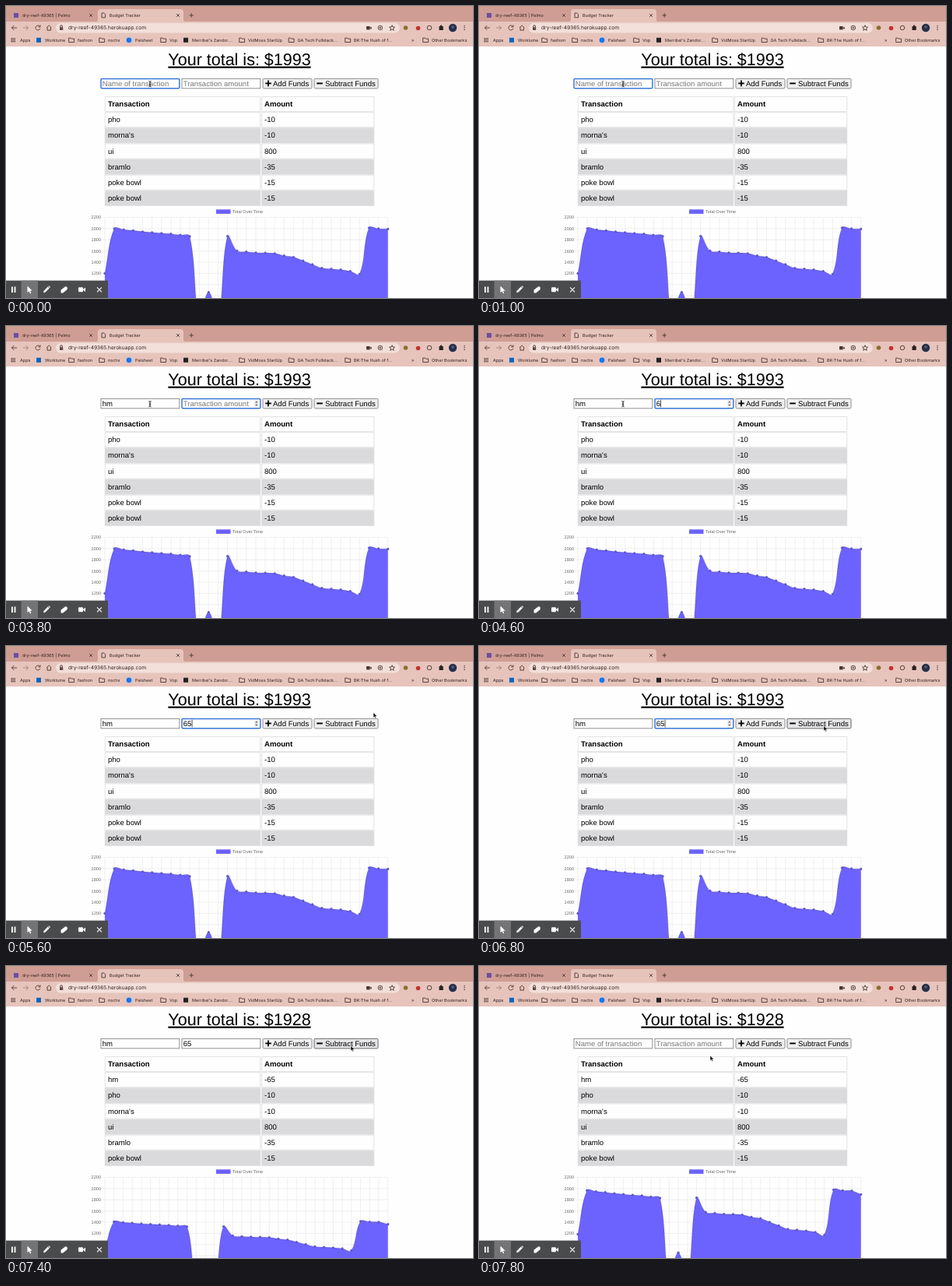
These frames come from a looping animation (600 px wide and 375 px high, 8 s). An HTML page:

```html
<!DOCTYPE html>
<html lang="en">
<head>
<meta charset="utf-8">
<title>Budget Tracker</title>
<style>
html, body { margin: 0; width: 100%; height: 100%; overflow: hidden; background: #fefefe; }
svg { display: block; width: 600px; height: 375px; }
text { font: 9.55px "Liberation Sans", Arial, sans-serif; text-rendering: geometricPrecision; white-space: pre; }
.ui text { font: 5.5px Inter, Roboto, sans-serif; fill: #33221f; }
.ui .url { font-size: 6.65px; }
.small text { font-size: 5.58px; fill: #666; }
.title { font-size: 21.5px; text-decoration: underline 1.5px; text-underline-offset: 2.5px; }
.bold { font-weight: bold; }
.line { fill: none; stroke: #4a3632; stroke-width: .9; }
</style>
</head>
<body>
<svg viewBox="0 0 600 375">
  <g id="page"></g>
  <g id="chart"></g>
  <g id="form"></g>
  <g id="chrome" class="ui"></g>
  <g id="tools"></g>
  <g id="pointer"></g>
</svg>
<script>
const LOOP = 8000, STEP = 200, SAVED = 7200, CLEARED = 7600;
const PURPLE = '#6c63ff';
const $ = id => document.getElementById(id);

const rect = (x, y, w, h, fill, extra = '') =>
  `<rect x="${x}" y="${y}" width="${w}" height="${h}" fill="${fill}" ${extra}/>`;
const text = (x, y, s, extra = '') => `<text x="${x}" y="${y}" ${extra}>${s}</text>`;
const path = (d, extra = 'class="line"') => `<path d="${d}" ${extra}/>`;
const dot = (x, y, r, fill) => `<circle cx="${x}" cy="${y}" r="${r}" fill="${fill}"/>`;
const cross = (x, y, r) => `M${x - r} ${y - r}l${2 * r} ${2 * r}m0 ${-2 * r}l${-2 * r} ${2 * r}`;

// Browser frame
function drawChrome() {
  const folder = x => path(`M${x - 3.3} 46.5v-5.4h2.5l1 1h3.4v4.4z`);
  const marks = [
    [50, 'Worklume', '#0a66c2'], [92, 'fashion'], [131, 'nschs'],
    [166, 'Palsheet', 'round'], [210, 'Vop'], [239, "Merribel's Zandor....", '#222'],
    [311, 'VidMoss StartUp'], [374.5, 'GA Tech Fullstack...'],
    [447, 'BK-The Hush of f...'], [547, 'Other Bookmarks']
  ];
  let s = rect(0, 0, 600, 21, '#cf9d93') + rect(0, 20, 600, 32, '#e6c4bc') +
    path('M114 21q4 0 4-4v-9q0-4 4-4h102q4 0 4 4v9q0 4 4 4z', 'fill="#e6c4bc"') +
    rect(10, 9, 6, 6, '#6b4fa0') + text(21, 13.8, 'dry-reef-49365 | Pelmo') +
    path(cross(109, 12, 1.8) + cross(221, 12, 1.8) + 'M235.5 12h5.4m-2.7-2.7v5.4') +
    path('M123 9h2.8l1.8 1.8v4H123z') + text(133, 13.8, 'Budget Tracker');
  s += path('M14 28H7.4m3-3l-3 3 3 3') +
    path('M22 28h6.6m-3-3l3 3-3 3', 'class="line" opacity=".45"') +
    path('M43.4 26.2a3 3 0 1 0 .5 2.6M44 24.5v2.4h-2.5') +
    path('M52 28l3.2-3 3.2 3m-5.4-.6v3.7h4.4v-3.7') +
    rect(64, 21.8, 442, 12.6, '#f2dfda', 'rx="6.3"') +
    rect(69, 27.2, 4.2, 3.7, '#5a4540') + path('M69.8 27v-1a1.3 1.3 0 0 1 2.6 0v1') +
    text(80, 30.3, 'dry-reef-49365.herokuapp.com', 'class="url"') +
    rect(463, 26, 4.6, 4.4, '#4a3632') + path('M467.4 28.2l2.2-1.7v3.4z', 'fill="#4a3632"') +
    path('M478 28a2.8 2.8 0 1 0 5.6 0a2.8 2.8 0 1 0-5.6 0m1.4 0h2.8m-1.4-1.4v2.8') +
    path('M496 24.7l1 2.3 2.5.2-1.9 1.6.6 2.5-2.2-1.4-2.2 1.4.6-2.5-1.9-1.6 2.5-.2z') +
    dot(513.5, 28, 2.8, '#8a7030') + dot(529.5, 28.5, 2.8, '#c4302b') +
    path('M541.2 28a2.8 2.8 0 1 0 5.6 0a2.8 2.8 0 1 0-5.6 0') +
    rect(556.5, 26, 5.2, 5, '#2b2220') + dot(559, 25.7, 1.2, '#2b2220') +
    dot(574, 28, 5.2, '#24304f') + dot(574, 27, 1.7, '#6c5a63') +
    [25.5, 28, 30.5].map(y => dot(589, y, .75, '#4a3632')).join('');
  for (let i = 0; i < 9; i++) s += rect(6.5 + i % 3 * 2, 41 + (i / 3 | 0) * 2, 1.4, 1.4, '#5b4540');
  s += text(18, 45.7, 'Apps') + text(521, 45.7, '»');
  for (const [x, label, icon] of marks) {
    s += !icon ? folder(x - 8) : icon === 'round' ? dot(x - 8, 43.8, 3.4, '#1877f2') : rect(x - 11, 40.8, 6, 6, icon);
    s += text(x, 45.7, label);
  }
  $('chrome').innerHTML = s;
}

// Recording toolbar
function drawTools() {
  const white = 'fill="#fff"';
  $('tools').innerHTML = rect(0, 352.6, 131, 23, '#4a4b4d') + rect(19.5, 352.6, 21.5, 23, '#747476') +
    rect(7, 360.5, 1.8, 7.5, '#fff') + rect(10.6, 360.5, 1.8, 7.5, '#fff') +
    path('M27.5 359.5v8.6l2.1-1.8 1.4 3 1.3-.6-1.4-2.9h2.8z', white) +
    path('M48 368.3l.7-2.6 5.1-5.1 1.9 1.9-5.1 5.1zM54.4 360l.8-.8 1.9 1.9-.8.8z', white) +
    path('M70.5 368.5v-3.8l6-4.7 2.2 1v3l-5.5 4.5z', white) +
    rect(93, 361.3, 6, 6, '#fff', 'rx="1"') + path('M99 364l3-2.4v5.4l-3-2.3z', white) +
    path(cross(120, 364.3, 3), 'stroke="#fff" stroke-width="1.1"');
}

// Heading and table
const ROWS = [['pho', -10], ["morna's", -10], ['ui', 800], ['bramlo', -35], ['poke bowl', -15], ['poke bowl', -15]];

function drawPage(saved) {
  const rows = [['Transaction', 'Amount'], ...(saved ? [['hm', -65]] : []), ...ROWS].slice(0, 7);
  let s = text(300, 75.6, `Your total is: $${saved ? 1928 : 1993}`, 'class="title" text-anchor="middle"');
  rows.forEach(([name, amount], i) => {
    const y = 116.6 + i * 20.1, fill = i && i % 2 === 0 ? '#dadadc' : '#fefefe';
    const style = i ? '' : 'class="bold"', edge = 'stroke="#dcdcde" stroke-width=".8"';
    s += rect(127.2, y, 199.6, 19.1, fill, edge) + rect(328.6, y, 144.2, 19.1, fill, edge) +
      text(131, y + 12.6, name, style) + text(332, y + 12.6, amount, style);
  });
  $('page').innerHTML = s;
}

// Chart
const LEFT = 127, RIGHT = 490.7, TOP = 271.5, BASE = 401, MIN = 400, UNIT = .072;
const GROW_FROM = 7180, GROW_MS = 1000;
const TOTALS = [1200, 2000, 1980, 1965, 1945, 1930, 1917, 1905, 1885, 1860, 400, 865, 400, 1865, 1605, 1585,
  1570, 1565, 1555, 1515, 1490, 1425, 1360, 1295, 1280, 1265, 1240, 1188, 2013, 1998, 1993];
const chartY = v => BASE - (v - MIN) * UNIT;

function curve(pts) {
  const clamp = y => Math.max(TOP, Math.min(BASE, y));
  const handles = pts.map((p, i) => {
    const a = pts[i - 1] || p, b = pts[i + 1] || p;
    const before = Math.hypot(p[0] - a[0], p[1] - a[1]), after = Math.hypot(b[0] - p[0], b[1] - p[1]);
    const at = k => [p[0] + k * (b[0] - a[0]), clamp(p[1] + k * (b[1] - a[1]))];
    const k = .4 / (before + after);
    return [at(-k * before), at(k * after)];
  });
  return 'M' + pts[0] + pts.slice(1).map((p, i) => `C${handles[i][1]} ${handles[i + 1][0]} ${p}`).join('');
}

function drawChart(saved, t) {
  const totals = saved ? [...TOTALS, 1928] : TOTALS;
  const grow = saved ? 1 - (1 - Math.min(1, (t - GROW_FROM) / GROW_MS)) ** 4 : 1;
  const gap = (RIGHT - LEFT) / (totals.length - 1);
  const pts = totals.map((v, i) => [LEFT + i * gap, BASE + (chartY(v) - BASE) * grow]);
  let grid = '', labels = '';
  for (const [x] of pts) grid += `M${x} ${TOP}V375`;
  for (let v = 2200; v >= 800; v -= 200) {
    const y = chartY(v);
    grid += `M122.5 ${y}H${RIGHT}`;
    labels += text(122, y + 2, v, 'text-anchor="end"');
  }
  const line = curve(pts);
  $('chart').innerHTML = path(grid, 'stroke="#e6e6e6" stroke-width=".6"') +
    `<g class="small">${labels}${text(291, 266, 'Total Over Time')}</g>` + rect(270, 261.3, 18.5, 5.6, PURPLE) +
    path(`${line}L${RIGHT} ${BASE}H${LEFT}Z`, `fill="${PURPLE}"`) +
    path(line, 'fill="none" stroke="#000" stroke-opacity=".13" stroke-width="1.3"') +
    pts.map(([x, y]) => dot(x, y, 1.6, '#5e57cf')).join('');
}

// Form
const within = (t, a, b) => t >= a && t < b;

function field(x, value, hint, focused, caret) {
  const frame = focused ? 'stroke="#3b78d8" stroke-width="1.5" rx="1.2"' : 'stroke="#85858a" stroke-width=".9"';
  let s = rect(x, 93.4, 100.8, 12.4, '#fff', frame) +
    text(x + 1.8, 102.6, value || hint, `fill="${value ? '#000' : '#777'}"`);
  if (caret) s += rect(x + 2 + ({ h: 5.3, hm: 13.3, 6: 5.3, 65: 10.7 }[value] || 0), 94.8, .7, 9.6, '#000');
  return s;
}

function button(x, w, label, icon, hover) {
  return rect(x, 93.3, w, 12.6, hover ? '#e5e5e7' : '#efeff0',
    `stroke="${hover ? '#58585c' : '#828286'}" stroke-width=".9" rx="1.4"`) +
    path(icon, 'stroke="#000" stroke-width="1.9"') + label;
}

function drawForm(t, [mx, my]) {
  const done = t >= CLEARED;
  const name = done || t < 1600 ? '' : t < 1800 ? 'h' : 'hm';
  const amount = done || t < 4600 ? '' : t < 5200 ? '6' : '65';
  const onName = t < 2000, onAmount = within(t, 2000, SAVED);
  const dark = within(t, 2800, 3200) || within(t, 3800, 4200) || within(t, 5800, 6400);
  const hover = mx > 396 && mx < 478 && my > 93 && my < 106;
  let s = field(122, name, 'Name of transaction', onName, onName && t >= 1600) +
    field(226, amount, 'Transaction amount', onAmount, onAmount && !dark);
  if (onAmount) s += rect(318.8, 94.7, 6, 9.8, '#ececee', 'rx="1.5"') +
    path('M320.2 98.4l1.6-2 1.6 2zM320.2 100.8l1.6 2 1.6-2z', 'fill="#555"');
  s += button(330, 63, text(343, 102.6, 'Add Funds'), 'M333.2 99.4h7.6m-3.8-3.8v7.6', false) +
    button(396, 82, text(410, 102.6, 'Subtract Funds'), 'M399.2 99.4h7.6', hover);
  $('form').innerHTML = s;
}

// Pointer: [time, x, y]
const MOVES = [[0, 185, 100], [5200, 185, 100], [5600, 472, 85.5], [5800, 470, 98], [6200, 456, 111],
  [6800, 443, 102.5], [7400, 443, 102.5], [7800, 297, 115], [LOOP, 297, 115]];

function pointerAt(t) {
  const i = MOVES.findIndex(m => m[0] > t), [t0, x0, y0] = MOVES[i - 1], [t1, x1, y1] = MOVES[i];
  const k = (t - t0) / (t1 - t0);
  return [x0 + (x1 - x0) * k, y0 + (y1 - y0) * k];
}

function drawPointer(t, [x, y]) {
  const beam = t <= 5200;
  $('pointer').setAttribute('transform', `translate(${x} ${y})`);
  $('pointer').innerHTML = beam
    ? path('M-1.7-3.6q1.7 0 1.7 1v5.4q0 1-1.7 1M1.7-3.6q-1.7 0-1.7 1v5.4q0 1 1.7 1M-.9.8h1.8',
      'fill="none" stroke="#222" stroke-width=".8"')
    : path('M0 0v6.6l1.5-1.4 1 2.3 1.1-.5-1-2.2h2.1z', 'fill="#000" stroke="#fff" stroke-width=".5"');
}

let shown = -1;
function tick(now) {
  const t = Math.floor(now % LOOP / STEP) * STEP;
  if (t !== shown) {
    const pos = pointerAt(t), saved = t >= SAVED;
    drawPage(saved);
    drawChart(saved, t);
    drawForm(t, pos);
    drawPointer(t, pos);
    shown = t;
  }
  requestAnimationFrame(tick);
}

drawChrome();
drawTools();
tick(0);
</script>
</body>
</html>
```
